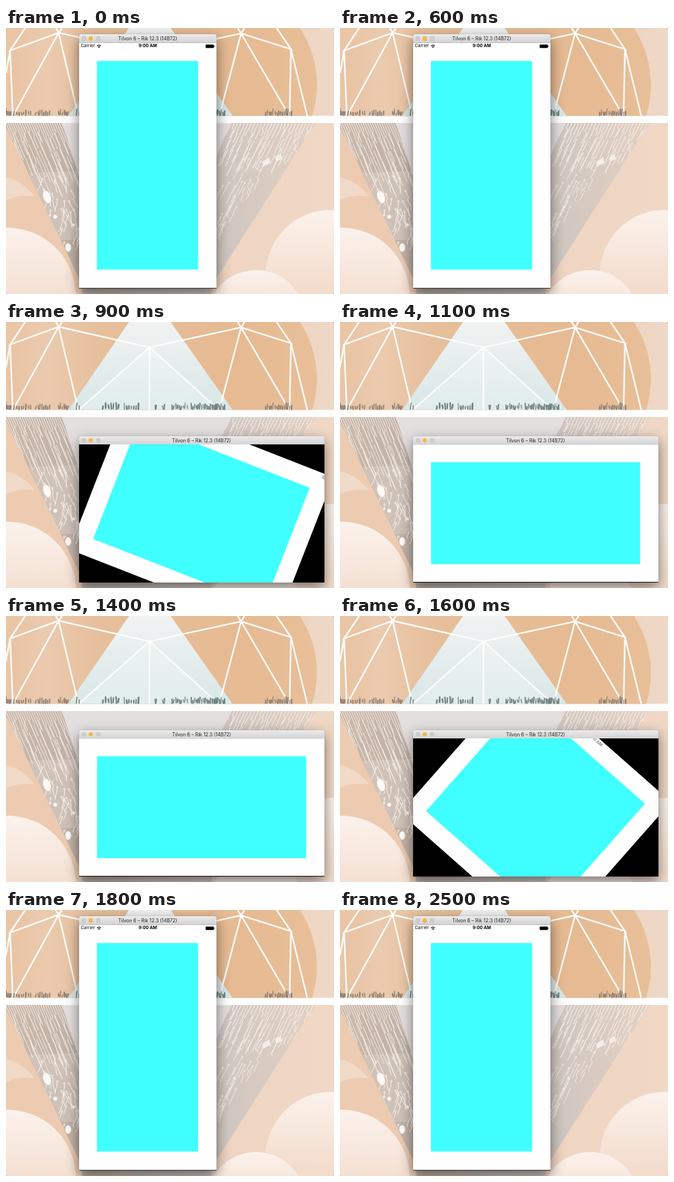
An HTML page that plays this animation: 480x389 px, repeating every 2.6 s.

```html
<!DOCTYPE html>
<html lang="en">
<head>
<meta charset="utf-8">
<title>Rotating window</title>
<style>
html, body { margin: 0; height: 100%; overflow: hidden; background: #333; }
#stage { position: relative; width: 480px; height: 389px; overflow: hidden; border-radius: 2px; font-family: Inter, Roboto, sans-serif; }
#stage > svg { display: block; }
#win { position: absolute; left: 106.5px; bottom: 8.5px; border-radius: 3px 3px 0 0; box-shadow: 0 0 1px rgba(0,0,0,.4), 0 7px 19px rgba(0,0,0,.5); }
header { position: relative; height: 12px; border-radius: 3px 3px 0 0; background: linear-gradient(#ebebeb, #d3d3d3); font-size: 7px; line-height: 13.4px; text-align: center; color: #222; white-space: nowrap; }
header i { position: absolute; top: 3.2px; width: 6.4px; height: 6.4px; border-radius: 50%; background: #cfcfcf; box-shadow: inset 0 0 0 .5px #bbb; }
header i:nth-child(2) { background: #f8b445; box-shadow: none; }
#screen { position: relative; overflow: hidden; background: #000; }
#view { position: absolute; left: 50%; top: 50%; background: #fffeff; }
#box { position: absolute; inset: 26.9px; background: #40ffff; }
#bar { position: absolute; left: 0; right: 0; top: 0; height: 11px; font-size: 6.3px; line-height: 11px; text-align: center; white-space: nowrap; color: #000; }
#bar span { position: absolute; left: 3px; }
#bar svg { position: absolute; top: 2px; }
</style>
</head>
<body>
<div id="stage">
<svg width="480" height="389" viewBox="0 0 480 389">
  <defs>
    <linearGradient id="sky"><stop stop-color="#eac5a6"/><stop offset=".5" stop-color="#ecc9ad"/><stop offset="1" stop-color="#eed8c7"/></linearGradient>
    <linearGradient id="sun"><stop stop-color="#e9c3a3"/><stop offset=".12" stop-color="#ebcaae"/><stop offset=".3" stop-color="#e6bf9b"/><stop offset=".75" stop-color="#e6ba92"/><stop offset="1" stop-color="#e8bf99"/></linearGradient>
    <linearGradient id="glass" x2="0" y2="1"><stop stop-color="#f1f2f2"/><stop offset="1" stop-color="#d8e7e7"/></linearGradient>
    <linearGradient id="dusk"><stop stop-color="#edcbb1"/><stop offset=".25" stop-color="#ebcab1"/><stop offset=".7" stop-color="#efd5c2"/><stop offset="1" stop-color="#f0d8c6"/></linearGradient>
    <linearGradient id="cloud" x2="0" y2="1"><stop stop-color="#fbf2ec"/><stop offset=".6" stop-color="#f3dccc"/></linearGradient>
    <linearGradient id="facet"><stop stop-color="#ccb8a8"/><stop offset=".28" stop-color="#bdb0a7"/><stop offset=".7" stop-color="#cfc6c0"/><stop offset="1" stop-color="#e4d0c1"/></linearGradient>
    <clipPath id="top"><path d="M0 0H480V128.500H0z"/></clipPath>
    <clipPath id="low"><path d="M0 139H480V389H0z"/></clipPath>
    <clipPath id="left"><path d="M-3 139H82L108 220V366z"/></clipPath>
    <clipPath id="right"><path d="M328 139H453L308 366V188z"/></clipPath>
  </defs>
  <path fill="#fdfdfd" d="M0 0H480V389H0z"/>
  <g clip-path="url(#top)">
    <path fill="url(#sky)" d="M0 0H480V129H0z"/>
    <ellipse cx="230" cy="83" rx="225" ry="182" fill="url(#sun)"/>
    <path fill="url(#glass)" d="M180 0H241L332 129H91z"/>
    <path fill="#fff" opacity=".2" d="M210 37L310 129H108z"/>
    <path fill="none" stroke="#fffdfa" stroke-width="2.3" d="M28 0L6 33L77 7L210 37L344 8L417 31L396 0M0 66L6 33L10 129L77 7L106 129L210 37V129M210 37L312 129L344 8L415 129L417 31L441 129M73 0L77 7L82 0M339 0L344 8L349 0"/>
    <g id="crowd" stroke-linecap="round"/>
  </g>
  <g clip-path="url(#low)">
    <path fill="url(#dusk)" d="M0 139H480V389H0z"/>
    <path fill="#f6e3d6" opacity=".6" d="M0 218Q25 224 42 246Q15 243 0 252z"/>
    <circle cx="475" cy="361" r="95" fill="url(#cloud)"/>
    <ellipse cx="366" cy="416" rx="68" ry="62" fill="url(#cloud)"/>
    <circle cx="2" cy="392" r="100" fill="url(#cloud)"/>
    <path fill="url(#facet)" d="M-3 139H453L308 366L300 389H112L107 366z"/>
    <path fill="#e3dfde" d="M82 139H328L308 188V250H108V220z"/>
    <path fill="#fff" opacity=".18" d="M33 212L108 209V310H79z"/>
    <g clip-path="url(#left)" id="west" fill="none" stroke="#f8f1eb"/>
    <g clip-path="url(#right)" id="east" fill="none" stroke="#f3ece7"/>
    <path fill="#f3eeea" d="M375 196L385 189L387 197L376 203zM394 189L402 184L404 191L395 196z"/>
  </g>
</svg>
<div id="win">
  <header><i style="left:4px"></i><i style="left:14.6px"></i><i style="left:25.3px"></i>Tilvon 6 – Rik 12.3 (14B72)</header>
  <div id="screen"><div id="view">
    <div id="box"></div>
    <div id="bar">
      <span>Carrier</span><b>9:00 AM</b>
      <svg style="left:26px" width="8" height="7" fill="none" stroke="#000" stroke-width="1"><path d="M1 2.8Q4 0 7 2.8M2.2 4.2Q4 2.6 5.8 4.2"/><circle cx="4" cy="5.4" r=".4"/></svg>
      <svg style="right:2.5px" width="14" height="7"><rect y="1" width="12" height="5" rx="1"/><path d="M12.5 2.6h.8v1.8h-.8z"/></svg>
    </div>
  </div></div>
</div>
</div>
<script>
const $ = id => document.getElementById(id);
let seed = 7;
const rnd = (a, b) => a + (b - a) * ((seed = seed * 16807 % 2147483647) / 2147483647);

// People along the horizon
const groups = [[0, 7, 4], [12, 36, 8], [44, 64, 8], [77, 91, 6], [104, 107, 2], [142, 165, 7], [173, 194, 7],
  [218, 220, 2], [229, 232, 2], [243, 265, 9], [271, 320, 20], [380, 418, 15]];
let people = "";
for (const [a, b, n] of groups)
  for (let i = 0; i < n; i++) {
    const x = a + (b - a) * i / (n - 1), y = rnd(118, 124);
    const color = x > 100 && x < 325 ? "#6f8482" : "#8d8075";
    people += `<path d="M${x} ${y}L${x + rnd(-1, 1)} ${rnd(126, 129)}" stroke="${color}" stroke-width="${rnd(1.2, 2.6)}"/>`;
  }
$("crowd").innerHTML = people;

// Circuit track: runs along a slope with small sideways jogs
function track(x, y, slope, runs, length, width, gap) {
  let d = `M${x} ${y}`;
  for (let i = 0; i < runs; i++) {
    const h = length * rnd(.5, 1.2), jog = rnd(-2.5, 2.5);
    d += `l${slope * h} ${h}${gap && i % 2 ? "m" : "l"}${jog} ${Math.abs(jog) + 1}`;
  }
  return `<path d="${d}" stroke-width="${width}"/>`;
}
const dot = (x, y, r) => `<circle cx="${x}" cy="${y}" r="${r}" stroke-width=".8"/>`;

let west = "", east = "";
for (let i = 0; i < 27; i++) west += track(-4 + i * 3.4, 138, .42, 4, 24, .9, true);
for (let i = 0; i < 34; i++) {
  const y = rnd(215, 340), x = 34 + (y - 212) * .5 + rnd(0, 50);
  west += track(x, y, rnd(-.4, .6), 2, 11, 1) + dot(x, y, 1.3);
}
west += `<g fill="#fdf9f6"><ellipse cx="60" cy="247" rx="5" ry="9" transform="rotate(-20 60 247)"/>
  <ellipse cx="91" cy="321" rx="4" ry="6"/><circle cx="72" cy="276" r="2.5"/><circle cx="99" cy="288" r="2"/></g>`;
for (let i = 0; i < 25; i++) east += track(330 + i * 5, 138, -.5, 5, 13, 1.1, true);
for (let i = 0; i < 24; i++) {
  const y = rnd(180, 290), x = 312 + rnd(0, 1) * (300 - y) * .75;
  east += track(x, y, -.5, 2, 11, .9) + dot(x, y, 1.1);
}
$("west").innerHTML = west;
$("east").innerHTML = east;

const LOOP = 2600, STEP = 100, TURN = 300, OUT = 695, BACK = 1458;
const SHORT = 201.8, LONG = 359.5;
const ease = u => (u = Math.min(1, Math.max(0, u)), u * u * (3 - 2 * u));

function size(el, w, h) {
  el.style.width = w + "px";
  el.style.height = h + "px";
}

function draw(now) {
  const t = Math.floor(now % LOOP / STEP) * STEP;
  const wide = t >= OUT && t < BACK + TURN;
  const p = ease((t - OUT) / TURN) - ease((t - BACK) / TURN);
  const grow = (LONG - SHORT) * p;
  $("win").style.width = (wide ? LONG : SHORT) + "px";
  size($("screen"), wide ? LONG : SHORT, wide ? SHORT : LONG);
  size($("view"), SHORT + grow, LONG - grow);
  $("view").style.transform = `translate(-50%, -50%) rotate(${wide ? 90 * (1 - p) : 0}deg)`;
  $("bar").style.opacity = 1 - p;
}

const start = performance.now();
function loop() {
  draw(performance.now() - start);
  requestAnimationFrame(loop);
}
loop();
</script>
</body>
</html>
```
